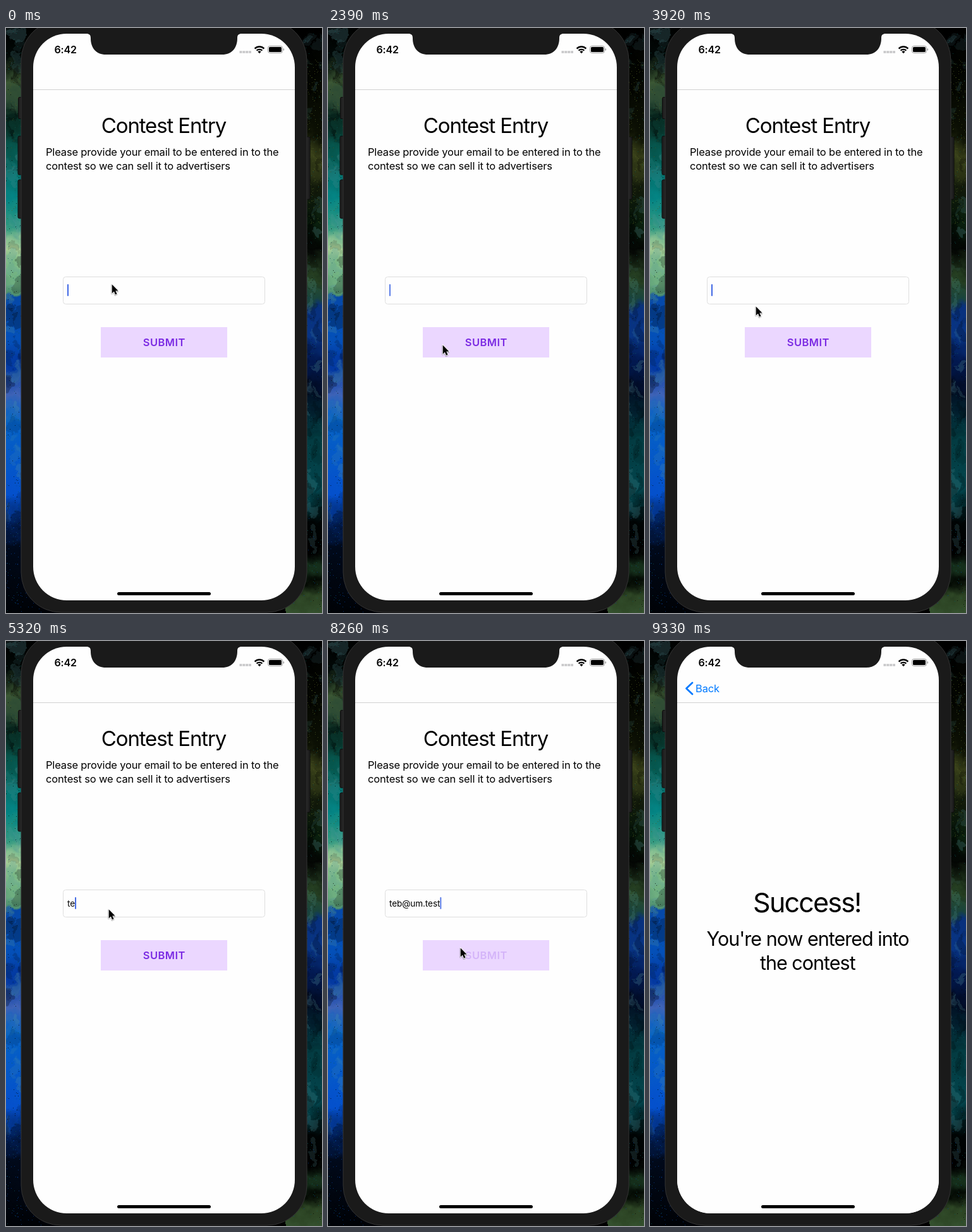
An HTML page for the animation above (9.52 s loop, 500 by 925 pixels).

```html
<!DOCTYPE html>
<html lang="en">
<head>
<meta charset="utf-8">
<title>Contest Entry</title>
<style>
  html, body { margin: 0; width: 100%; height: 100%; overflow: hidden; background: #000; }
  svg { position: absolute; left: 0; top: 0; width: 500px; height: 925px; }
  #backdrop { will-change: transform; }
  text { font-family: Inter, Roboto, "Liberation Sans", sans-serif; font-optical-sizing: none; white-space: pre; }
  .mid { text-anchor: middle; }
  .title { font-size: 33px; letter-spacing: -1.15px; }
  .body { font-size: 16.5px; letter-spacing: -.17px; }
  .field { font-size: 13.6px; letter-spacing: -.1px; }
  .button { font-size: 16.5px; font-weight: 600; letter-spacing: .45px; fill: #7b2be3; }
  .big { font-size: 43px; letter-spacing: -1.8px; }
  .note { font-size: 30.5px; letter-spacing: -1px; }
  .clock { font-size: 16px; font-weight: 600; letter-spacing: -.15px; }
  .back { font-size: 16.5px; letter-spacing: -.15px; fill: #007aff; }
</style>
</head>
<body>
<svg id="backdrop" viewBox="0 0 500 925">
  <defs>
    <filter id="jagged" filterUnits="userSpaceOnUse" x="-40" y="-40" width="580" height="1005" color-interpolation-filters="sRGB">
      <feTurbulence type="fractalNoise" baseFrequency=".045" numOctaves="4" seed="4"/>
      <feDisplacementMap in="SourceGraphic" scale="34" xChannelSelector="R" yChannelSelector="G"/>
    </filter>
    <linearGradient id="left" gradientUnits="userSpaceOnUse" x2="0" y2="925"/>
    <linearGradient id="right" gradientUnits="userSpaceOnUse" x2="0" y2="925"/>
  </defs>
  <g filter="url(#jagged)">
    <rect x="-40" y="-40" width="120" height="1005" fill="url(#left)"/>
    <rect x="438" y="-40" width="102" height="1005" fill="url(#right)"/>
    <g id="clouds"></g>
  </g>
  <g id="dust"></g>
</svg>

<svg viewBox="0 0 500 925">
  <defs>
    <clipPath id="screen"><rect x="43" y="9" width="414" height="896" rx="53"/></clipPath>
    <linearGradient id="edge"><stop stop-opacity="0"/><stop offset="1" stop-opacity=".03"/></linearGradient>
  </defs>

  <g fill="#202020" stroke="#0b0b0b">
    <rect x="19.5" y="109.5" width="8" height="34" rx="2"/>
    <rect x="19" y="171" width="8" height="61" rx="2"/>
    <rect x="19" y="240" width="8" height="61" rx="2"/>
    <rect x="473" y="172" width="8" height="99" rx="2"/>
  </g>
  <rect x="24" y="-12" width="452" height="936" rx="63" fill="#1a1a1a" stroke="#333"/>

  <g clip-path="url(#screen)">
    <rect x="43" y="9" width="414" height="896" fill="#fefefe"/>
    <g id="entry">
      <text class="title mid" x="249.5" y="166">Contest Entry</text>
      <text class="body" x="63" y="202">Please provide your email to be entered in to the</text>
      <text class="body" x="63" y="224">contest so we can sell it to advertisers</text>
      <g id="input">
        <rect x="90.5" y="393.5" width="319" height="43" rx="4" fill="#fefefe" stroke="#dedede"/>
        <text id="email" class="field" x="97" y="419.5"></text>
        <rect id="caret" y="405" width="2" height="19" rx="1" fill="#4068e4"/>
      </g>
      <rect x="150" y="473" width="200" height="48" fill="#ebd7ff"/>
      <text id="submit" class="button mid" x="250.3" y="503">SUBMIT</text>
    </g>
    <rect id="dim" x="43" y="98" width="414" height="807"/>
    <g id="success">
      <rect x="28" y="98" width="15" height="807" fill="url(#edge)"/>
      <rect x="43" y="98" width="414" height="807" fill="#fefefe"/>
      <text class="big mid" x="248.4" y="429">Success!</text>
      <text class="note mid" x="249.6" y="482">You're now entered into</text>
      <text class="note mid" x="249.3" y="520">the contest</text>
    </g>
    <rect id="navDim" x="43" y="9" height="88"/>
    <path d="M43 97.5H457" stroke="#d2d2d2"/>
    <g id="nav">
      <path d="M67 66L57.5 75L67 84" fill="none" stroke="#007aff" stroke-width="2.8" stroke-linecap="round" stroke-linejoin="round"/>
      <text id="back" class="back" y="81">Back</text>
    </g>
    <text class="clock" x="76.5" y="39.6">6:42</text>
    <path d="M369.5 38h18.5" stroke="#c6c6c8" stroke-width="3.6" stroke-dasharray="4 .9"/>
    <path d="M393.6 32.6A10.5 10.5 0 0 1 408.4 32.6M396.6 35.7A6.3 6.3 0 0 1 405.4 35.7" fill="none" stroke="#000" stroke-width="2.4"/>
    <path d="M401 40.2L398.4 37.5A3.7 3.7 0 0 1 403.6 37.5Z"/>
    <rect x="414.5" y="28.5" width="23" height="11" rx="3" fill="none" stroke="#9a9a9a"/>
    <rect x="416" y="30" width="20" height="8" rx="1.6"/>
    <path d="M438.7 32v4q1.5-.6 1.5-2t-1.5-2" fill="#9a9a9a"/>
    <rect x="176" y="892" width="148" height="5" rx="2.5"/>
  </g>
  <path d="M127 8V9C132 9 134 11 134 16C134 32 143 42 158 42H342C357 42 366 32 366 16C366 11 368 9 373 9V8Z" fill="#1a1a1a"/>

  <g id="cursor">
    <path d="M0 1V14.5L3.2 11.6L5.4 16.8L7.8 15.8L5.6 10.8H9.8Z" stroke="#0003" stroke-width="3" stroke-linejoin="round" transform="translate(.4 .6)"/>
    <path d="M0 0V13.8L3.2 10.9L5.4 16L7.8 15L5.6 10H9.8Z" transform="translate(.7 .6)" stroke="#fff" stroke-width="1.6" paint-order="stroke"/>
  </g>
</svg>
<script>
const LOOP = 9520, PUSH = 8288, ADDRESS = 'teb@um.test';
const KEY_TIMES = [4960, 5320, 5470, 5860, 6190, 6370, 6520, 6760, 6880, 7030, 7150];
// Caret: time it fades out, time it fades in
const BLINKS = [[440, 800], [1415, 1890], [2370, 2870], [3380, 3780], [4370, 4830], [7750, 8140], [PUSH, LOOP]];
const PRESSES = [[1400, 1560], [3240, 3400], [8080, 8290]];
const WOBBLES = [1600, 3420];
// Pointer tip: time, x, y
const PATH = [
  [0, 167, 405], [700, 167, 405], [940, 181, 503], [1060, 181, 503], [1140, 181, 501],
  [2860, 181, 501], [2990, 180, 499], [3640, 180, 499], [3920, 167, 440], [4160, 162, 424],
  [7740, 162, 424], [8070, 209, 485], [8760, 209, 485], [9320, 225, 930]
];
const NS = 'http://www.w3.org/2000/svg';
const $ = id => document.getElementById(id);
const set = (el, attrs) => { for (const k in attrs) el.setAttribute(k, attrs[k]); return el; };
const add = (parent, tag, attrs) => parent.appendChild(set(document.createElementNS(NS, tag), attrs));
const ramp = (t, from, length) => Math.min(1, Math.max(0, (t - from) / length));
const smooth = u => u * u * (3 - 2 * u);
const shift = x => `translate(${x.toFixed(2)} 0)`;

let seed = 71;
const rand = () => (seed = seed * 16807 % 2147483647) / 2147483647;

// Coloured powder behind the phone
function stops(id, list) {
  for (const item of list.split(',')) {
    const [y, color] = item.trim().split(' ');
    add($(id), 'stop', { offset: y / 925, 'stop-color': '#' + color });
  }
}
stops('left', `0 000, 55 020a08, 85 3c5834, 115 2c4a34, 140 08281f, 190 06554c, 270 048484,
  310 2c9680, 345 a9cf98, 385 76b684, 420 4f9070, 428 0648a8, 490 0450b8, 530 0338a0,
  582 3f63b6, 615 0562c4, 735 0450cc, 780 02266c, 815 010a1c, 925 000206`);
stops('right', `0 000, 70 030501, 165 0c1004, 205 3a421a, 260 10180a, 305 0a200e, 350 030503,
  395 2c4a28, 428 1a443c, 445 08307c, 485 083484, 525 021a54, 575 010a20, 640 033a40,
  730 03444c, 785 000404, 825 000, 855 16301c, 875 040a04, 905 2c4424, 925 34502e`);

for (let i = 0; i < 130; i++) {
  const x = rand() * 32, y = rand() * 820, dark = i % 2 ? .5 : .7;
  add($('clouds'), 'ellipse', {
    cx: i % 2 ? x : 500 - x, cy: y, rx: 3 + rand() * 8, ry: 4 + rand() * 15,
    fill: rand() < dark ? '#000' : '#5a9aa0', opacity: .08 + rand() * .2
  });
}
['#07409c', '#0a5a58', '#4c5a22', '#000'].forEach((fill, k) => {
  const low = k === 0, olive = k === 2;
  let d = '';
  for (let i = 0; i < 230; i++) {
    const x = rand() * (low ? 70 : 28);
    const y = low ? 740 + rand() * 185 : olive ? 50 + rand() * 260 : rand() * 925;
    const right = rand() < (low ? .15 : olive ? .8 : .5);
    d += `M${(right ? 499 - x : x).toFixed()} ${y.toFixed()}h1v1h-1z`;
  }
  add($('dust'), 'path', { d, fill, opacity: .7 });
});

function pointer(t) {
  const i = PATH.findIndex(p => p[0] > t);
  if (i < 0) return PATH[PATH.length - 1].slice(1);
  const a = PATH[i - 1], b = PATH[i], u = smooth(ramp(t, a[0], b[0] - a[0]));
  return [a[1] + (b[1] - a[1]) * u, a[2] + (b[2] - a[2]) * u];
}

function caretAlpha(t) {
  let alpha = 1;
  for (const [off, on] of BLINKS) alpha -= ramp(t, off, 150) - ramp(t, on, 140);
  return alpha;
}

function labelAlpha(t) {
  let alpha = 1;
  for (const [down, up] of PRESSES) alpha -= .8 * (smooth(ramp(t, down, 110)) - smooth(ramp(t, up, 250)));
  return alpha;
}

// Two full swings of the input box
function tilt(t) {
  const start = WOBBLES.find(s => t >= s && t < s + 400);
  return start === undefined ? 0 : -4 * Math.sin((t - start) / 100 * Math.PI);
}

function draw(t) {
  const typed = ADDRESS.slice(0, KEY_TIMES.filter(k => k <= t).length);
  $('email').textContent = typed;
  set($('caret'), { x: 97 + (typed ? $('email').getComputedTextLength() : 0), opacity: caretAlpha(t) });
  set($('input'), { transform: `rotate(${tilt(t)} 250 415)` });
  set($('submit'), { opacity: labelAlpha(t) });

  // Critically damped spring
  const u = Math.max(0, t - PUSH) / 1000 * Math.sqrt(1000 / 3);
  const rest = t > 8860 ? 0 : (1 + u) * Math.exp(-u);
  const pushing = t >= PUSH;
  set($('entry'), { transform: shift(-124 * (1 - rest)) });
  set($('dim'), { opacity: .1 * (1 - rest) });
  set($('success'), { transform: shift(414 * rest), display: pushing ? 'inline' : 'none' });
  set($('navDim'), { width: pushing ? Math.min(414, 475 * rest) : 0, opacity: .045 * (1 - rest) });
  set($('nav'), { opacity: 1 - rest });
  set($('back'), { x: 72 + 54 * rest });

  const [x, y] = pointer(t);
  set($('cursor'), { transform: `translate(${x.toFixed(1)} ${y.toFixed(1)})` });
}

const start = performance.now();
function tick() {
  draw((performance.now() - start) % LOOP);
  requestAnimationFrame(tick);
}
tick();
</script>
</body>
</html>
```
